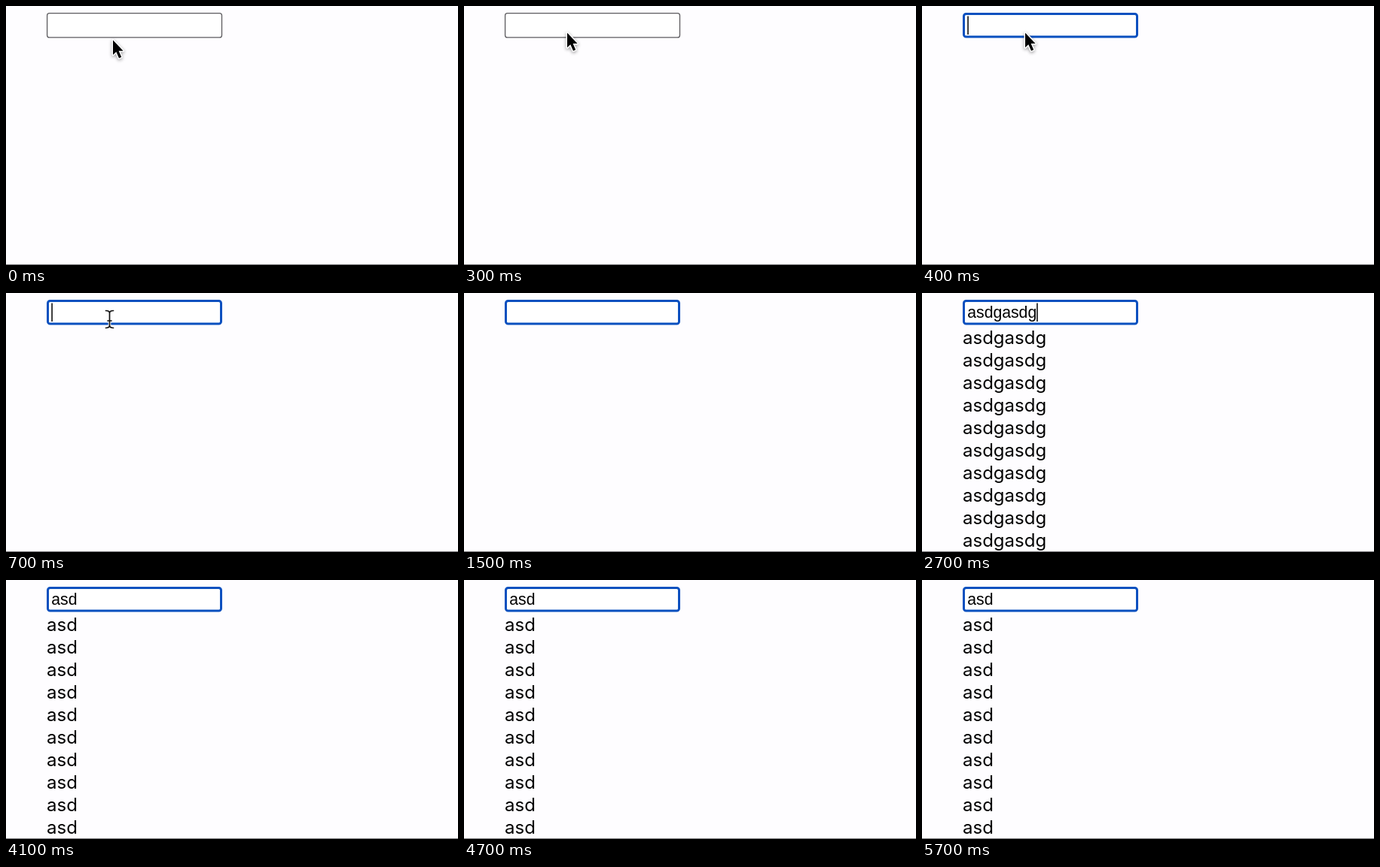
These frames come from a looping animation (600x345 px, 6.1 s). An HTML page with a canvas:

```html
<!DOCTYPE html>
<html lang="en">
<head>
<meta charset="utf-8">
<title>Search field</title>
<style>
  html, body { margin: 0; width: 100%; height: 100%; overflow: hidden; background: #fefdff; }
  canvas { display: block; width: 600px; height: 345px; }
</style>
</head>
<body>
<canvas id="stage"></canvas>
<script>
const LOOP = 6100, W = 600, H = 345;
const INPUT_FONT = '21.2px "Liberation Sans", Arial, sans-serif';
const LIST_FONT = '24px Inter, sans-serif';
const TEXT_X = 60.3;

const canvas = document.getElementById('stage');
const ctx = canvas.getContext('2d');
const dpr = window.devicePixelRatio || 1;
canvas.width = W * dpr;
canvas.height = H * dpr;

function roundBox(x, y, w, h, r, color, width) {
  ctx.beginPath();
  ctx.roundRect(x, y, w, h, r);
  ctx.fillStyle = '#fff';
  ctx.fill();
  ctx.strokeStyle = color;
  ctx.lineWidth = width;
  ctx.stroke();
}

function drawInput(focused) {
  if (focused) roundBox(55.5, 10.5, 230, 30.5, 3, '#0a50bf', 3);
  else roundBox(54.6, 9.6, 231.9, 32.3, 3, '#5c5b5f', 1.3);
}

function drawText(value) {
  ctx.fillStyle = '#000';
  ctx.font = INPUT_FONT;
  ctx.fillText(value, TEXT_X, 33);
  ctx.font = LIST_FONT;
  for (let i = 0; i < 10; i++) ctx.fillText(value, 54, 67.6 + i * 30.05);
}

function drawCaret(value) {
  ctx.font = INPUT_FONT;
  ctx.fillStyle = '#000';
  ctx.fillRect(TEXT_X + ctx.measureText(value).width, 13.5, 1.5, 24.5);
}

function drawArrow(x, y) {
  const shape = new Path2D('M0 0V19.5L4.3 15.5L8 23.9L11.2 22.5L7.6 14.3H13.6Z');
  ctx.save();
  ctx.translate(x, y);
  ctx.lineJoin = 'round';
  ctx.save();
  ctx.shadowColor = 'rgba(0,0,0,.4)';
  ctx.shadowBlur = 4 * dpr;
  ctx.shadowOffsetY = 1.5 * dpr;
  ctx.strokeStyle = '#fff';
  ctx.lineWidth = 3;
  ctx.stroke(shape);
  ctx.restore();
  ctx.fillStyle = '#000';
  ctx.fill(shape);
  ctx.restore();
}

function drawIBeam(x, y) {
  const shape = new Path2D(
    'M-5 -11.5Q0 -11.5 0 -8V8Q0 11.5 -5 11.5' +
    'M5 -11.5Q0 -11.5 0 -8M0 8Q0 11.5 5 11.5M-2.5 2H2.5');
  ctx.save();
  ctx.translate(x, y);
  ctx.lineCap = 'round';
  for (const [color, width] of [['#fff', 3.6], ['#111', 1.7]]) {
    ctx.strokeStyle = color;
    ctx.lineWidth = width;
    ctx.stroke(shape);
  }
  ctx.restore();
}

function drawPointer(t) {
  if (t < 700) {
    const p = Math.min(Math.floor(t / 100) - 1, 2) / 2;
    const k = Math.max(0, p);
    drawArrow(142 - 5 * k, 45.5 - 9.7 * k);
  } else if (t < 900) {
    drawIBeam(137.5, 35);
  }
}

function caretOn(t) {
  if (t < 1000) return t >= 400;
  if (t < 4100) return t >= 2700;
  return t >= 4200 && Math.floor((t - 4200) / 500) % 2 === 0;
}

function render(t) {
  const value = t < 2700 ? '' : t < 4100 ? 'asdgasdg' : 'asd';
  ctx.setTransform(dpr, 0, 0, dpr, 0, 0);
  ctx.fillStyle = '#fefdff';
  ctx.fillRect(0, 0, W, H);
  drawInput(t >= 400);
  if (value) drawText(value);
  if (caretOn(t)) drawCaret(value);
  drawPointer(t);
  ctx.fillStyle = '#7d7c7f';
  ctx.fillRect(0, 344, W, 1);
}

const start = performance.now();
function tick() {
  render((performance.now() - start) % LOOP);
  requestAnimationFrame(tick);
}
tick();
</script>
</body>
</html>
```
